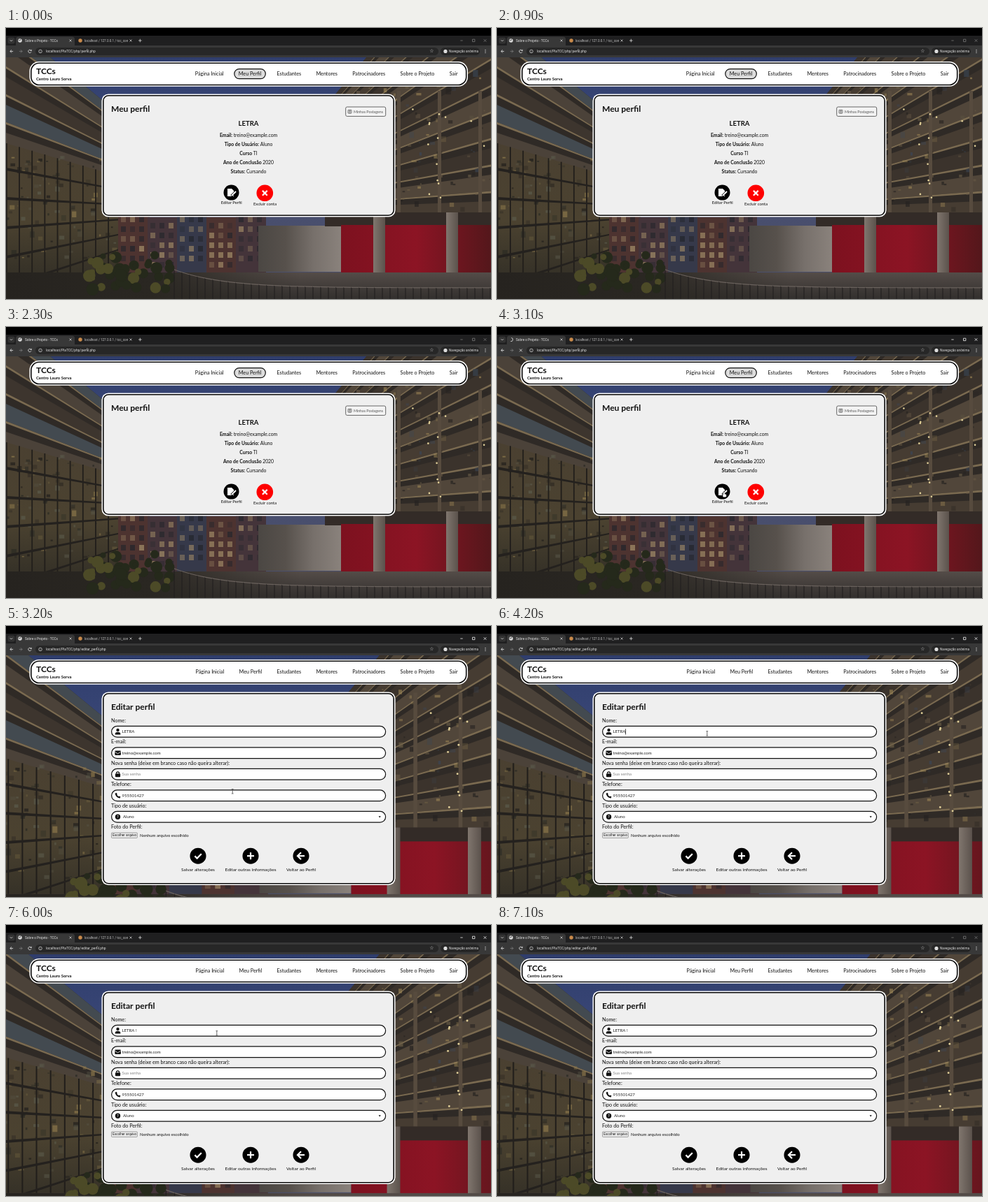
An HTML page with a canvas for the animation above (8 s loop, 692 by 388 pixels).

```html
<!DOCTYPE html>
<html lang="pt-BR">
<head>
<meta charset="utf-8">
<title>Perfil</title>
<style>
html, body { margin: 0; width: 100%; height: 100%; overflow: hidden; background: #000; }
canvas { display: block; width: 692px; height: 388px; }
</style>
</head>
<body>
<canvas id="stage" width="692" height="388"></canvas>
<script>
const W = 692, H = 388, TOP = 42, LOOP = 8000, STEP = 100;
const UI = 'Roboto, "Open Sans", sans-serif';
const PAGE = 'Lato, "Open Sans", sans-serif';
const SIGN = '"DejaVu Sans", sans-serif';
const USER = 'LETRA', MAIL = 'treino@example.com', PHONE = '955501427';
let c = document.getElementById('stage').getContext('2d');

// ---------- helpers ----------
const mix = (a, b, k) => a + (b - a) * k;
const clamp = k => Math.min(1, Math.max(0, k));

function rect(x, y, w, h, fill) { c.fillStyle = fill; c.fillRect(x, y, w, h); }

function round(x, y, w, h, r, fill, stroke, lw = 1) {
  c.beginPath();
  c.roundRect(x, y, w, h, r);
  if (fill) { c.fillStyle = fill; c.fill(); }
  if (stroke) { c.strokeStyle = stroke; c.lineWidth = lw; c.stroke(); }
}

function dot(x, y, r, fill) {
  c.beginPath();
  c.arc(x, y, r, 0, 7);
  c.fillStyle = fill;
  c.fill();
}

function ring(x, y, r, color, lw, from = 0, to = 7) {
  c.beginPath();
  c.arc(x, y, r, from, to);
  c.strokeStyle = color;
  c.lineWidth = lw;
  c.stroke();
}

// Points are offsets from (x, y).
function path(x, y, pts) {
  c.beginPath();
  for (const [dx, dy] of pts) c.lineTo(x + dx, y + dy);
}

function poly(x, y, fill, ...pts) { path(x, y, pts); c.fillStyle = fill; c.fill(); }

function line(x, y, color, lw, ...pts) {
  path(x, y, pts);
  c.strokeStyle = color;
  c.lineWidth = lw;
  c.stroke();
}

function cross(x, y, r, color, lw) {
  line(x, y, color, lw, [-r, -r], [r, r]);
  line(x, y, color, lw, [r, -r], [-r, r]);
}

function plus(x, y, r, color, lw) {
  line(x, y, color, lw, [-r, 0], [r, 0]);
  line(x, y, color, lw, [0, -r], [0, r]);
}

function arrow(x, y, r, color, lw, dir = -1) {
  line(x, y, color, lw, [0, -r], [dir * r, 0], [0, r]);
  line(x, y, color, lw, [dir * r, 0], [-dir * r, 0]);
}

function setFont(size, weight = 400, font = PAGE) { c.font = `${weight} ${size}px ${font}`; }

function text(s, x, y, size, { color = '#111', weight = 400, align = 'left', font = PAGE } = {}) {
  setFont(size, weight, font);
  c.fillStyle = color;
  c.textAlign = align;
  c.textBaseline = 'middle';
  c.fillText(s, x, y);
  return c.measureText(s).width;
}

function shade(x0, y0, x1, y1, ...stops) {
  const g = c.createLinearGradient(x0, y0, x1, y1);
  stops.forEach((s, i) => g.addColorStop(i / (stops.length - 1), s));
  return g;
}

function seeded(seed) {
  return () => (seed = (seed * 16807) % 2147483647) / 2147483647;
}

// ---------- backdrop ----------
const EYE = [330, 262];

// A strip running from the side edge towards the vanishing point.
function strip(edge, y0, y1, reach, fill) {
  const at = (y, k) => [mix(edge, EYE[0], k), mix(y, EYE[1], k)];
  poly(0, 0, fill, at(y0, 0), at(y0, reach), at(y1, reach), at(y1, 0));
}

function specks(n, rnd, x, y, w, h, colors) {
  for (let i = 0; i < n; i++) {
    c.globalAlpha = 0.2 + rnd() * 0.5;
    const size = 1.5 + rnd() * 6;
    rect(x + rnd() * w, y + rnd() * h, size, size * (0.4 + rnd()), colors[Math.floor(rnd() * colors.length)]);
  }
  c.globalAlpha = 1;
}

function wing(edge, top, reach, tones, pitch) {
  strip(edge, top, H, reach, '#2f2a26');
  for (let y = top, i = 0; y < EYE[1]; y += pitch, i++) {
    strip(edge, y, y + pitch * 0.62, reach, tones[i % tones.length]);
    strip(edge, y + pitch * 0.62, y + pitch * 0.7, reach, '#7a6a50');
  }
}

function leftWing(rnd) {
  wing(0, -10, 0.62, ['#434a50', '#4b4239', '#3d352e'], 40);
  strip(0, 165, 470, 0.62, shade(0, 165, 0, H, '#4a4031', '#4b4230', '#2b2923'));
  specks(120, rnd, 0, 180, 185, 150, ['#96804f', '#252722', '#5b5b4c', '#1f1d1b']);
  for (let k = 0; k < 0.62; k += 0.055) {
    const x = mix(0, EYE[0], k);
    rect(x, mix(165, EYE[1], k), 1.8, 200, '#211e1b');
  }
  for (let y = 200; y < H; y += 42) strip(0, y, y + 4, 0.62, '#24211e');
}

function rightWing(rnd) {
  wing(W, -170, 0.62, ['#3b332c', '#51463a', '#463c32'], 38);
  specks(90, rnd, 500, 60, 190, 200, ['#a48c58', '#252220', '#6d5f48', '#3c4655']);
  for (let x = 500; x < W; x += 58) rect(x, 90, 5, 180, '#574b3e');
  for (let i = 0; i < 14; i++) dot(560 + rnd() * 130, 90 + rnd() * 170, 1.3, '#e0cf98');
}

function street(rnd) {
  const tones = ['#4d3330', '#44343a', '#36394a'];
  for (let i = 0; i < 5; i++) {
    const x = 160 + i * 42, top = 262 + (i % 2) * 9;
    rect(x, top, 43, 90, tones[i % 3]);
    for (let n = 0; n < 15; n++) {
      c.globalAlpha = 0.25 + rnd() * 0.5;
      rect(x + 4 + (n % 3) * 13, top + 8 + Math.floor(n / 3) * 14, 7, 8, rnd() > 0.5 ? '#a08a66' : '#23252b');
    }
    c.globalAlpha = 1;
  }
  rect(360, 283, 118, 66, shade(360, 0, 478, 0, '#4b4743', '#57514c', '#77706b', '#8a827c'));
  rect(455, 264, 237, 20, '#332b27');
  rect(478, 282, 214, 72, shade(478, 0, W, 0, '#7d111f', '#8c1424', '#54171b'));
  for (let x = 524; x < W; x += 104) rect(x, 264, 17, 92, shade(x, 0, x + 17, 0, '#80766e', '#5b524c'));
}

function ground(rnd) {
  rect(0, 350, W, 80, shade(0, 350, 0, H, '#544c48', '#322f2d'));
  rect(0, 350, 420, 80, shade(0, 0, 420, 0, '#26231f', '#2a2722', '#2a272200'));
  for (let i = 0; i < 45; i++) dot(115 + rnd() * 120, 325 + rnd() * 50, 3 + rnd() * 6, rnd() > 0.6 ? '#4c4a27' : '#25291b');
  const rail = x => 346 + 26 * (1 - Math.exp((240 - x) / 70));
  for (let x = 240; x < W; x += 11) {
    line(x, rail(x), '#211f1f', 1.1, [0, 0], [0, 50]);
    line(x, rail(x), '#6a625d', 1.2, [0, 0], [11, rail(x + 11) - rail(x)]);
  }
}

function scene(zoom) {
  const layer = document.createElement('canvas');
  layer.width = W;
  layer.height = H;
  const main = c, rnd = seeded(41);
  c = layer.getContext('2d');
  c.translate(W / 2, TOP);
  c.scale(zoom, zoom);
  c.translate(-W / 2, -TOP);
  rect(0, TOP, W, H, shade(0, TOP, 0, 290, '#2f3d6c', '#3d4a7a', '#4a4f6c'));
  leftWing(rnd);
  rightWing(rnd);
  street(rnd);
  ground(rnd);
  c = main;
  return layer;
}

const backdrops = [scene(1), scene(1.11)];

// ---------- browser frame ----------
const INK = '#d8d8d8', DIM = '#777', BAR = '#383838';

function tab(x, title, size, color, end) {
  text(title, x + 13, 18.2, size, { color, font: UI });
  cross(end, 18, 1.5, INK, 0.7);
}

function browser(s) {
  const ctl = s.active ? '#f2f2f2' : DIM, y = 33.4;
  rect(0, 0, W, 11, '#000');
  rect(0, 11, W, 15, '#1f1f20');
  rect(0, 25, W, 17, BAR);
  round(14, 12.5, 84, 16, [4, 4, 0, 0], BAR);
  round(2.5, 13.5, 10, 9, 2.5, '#333');
  line(7.5, 18, INK, 0.8, [-1.7, -0.8], [0, 1], [1.7, -0.8]);

  if (s.loading) ring(20, 18, 2.6, INK, 0.9, -1.4, 1.8);
  else {
    dot(20, 18, 2.8, INK);
    line(20, 18, BAR, 0.7, [-2.4, -0.8], [0, 0], [1, -2.4]);
  }
  tab(14, 'Sobre o Projeto - TCCs', 4.7, '#e4e4e4', 92);
  dot(106, 18, 2.7, '#c98a4a');
  tab(99, 'localhost / 127.0.0.1 / tcc_con', 4.6, '#c4c4c4', 178);
  plus(191.3, 18, 2.3, INK, 0.8);

  line(650, 18, ctl, 0.8, [-1.7, 0], [1.7, 0]);
  round(665.5, 16.2, 3.4, 3.4, 0, null, ctl, 0.8);
  cross(683.5, 18, 1.8, ctl, 0.8);

  arrow(8, y, 2.1, INK, 0.9);
  arrow(21, y, 2.1, DIM, 0.9, 1);
  if (s.loading) cross(34, y, 1.9, INK, 0.9);
  else {
    ring(34, y, 2.2, INK, 0.9, 0.4, 5.4);
    poly(36.6, y, INK, [0, -2.8], [0, -0.4], [-2.4, -0.4]);
  }
  round(42, 28, 575, 11, 5.5, '#272727');
  ring(49, y, 2.3, INK, 0.7);
  text('i', 49, y + 0.2, 3.8, { color: INK, align: 'center', font: UI });
  const page = s.edit ? 'editar_perfil.php' : 'perfil.php';
  text('localhost/PlaTCC/php/' + page, 57, y + 0.3, 4.9, { color: '#e2e2e2', font: UI });
  text('☆', 607.5, y, 7, { color: INK, align: 'center', font: SIGN });
  round(620, 28, 56, 11, 5.5, '#262626');
  dot(627, y, 2.6, '#dedede');
  text('Navegação anônima', 632, y + 0.3, 4.6, { color: '#e2e2e2', font: UI });
  for (let i = -1; i < 2; i++) dot(684, y + i * 2, 0.6, INK);
}

// ---------- page ----------
const NAV = ['Página Inicial', 'Meu Perfil', 'Estudantes', 'Mentores', 'Patrocinadores', 'Sobre o Projeto', 'Sair'];
const BOLD = { weight: 700 }, MID = { align: 'center' };

function frame(x, y, w, h, r, fill) {
  round(x, y, w, h, r, '#fff');
  round(x + 2.3, y + 2.3, w - 4.6, h - 4.6, r - 2, fill, '#0a0a0a', 1.6);
}

function header(edit) {
  frame(33.5, 48, 625.5, 35.8, 13.5, '#fff');
  text('TCCs', 43, 62, 12, BOLD);
  text('Centro Lauro Sorva', 43, 73.2, 5.9, BOLD);
  let x = 644.5;
  for (const label of [...NAV].reverse()) {
    setFont(7.2);
    const w = c.measureText(label).width, pill = !edit && label === 'Meu Perfil';
    if (pill) {
      x -= 0.8;
      round(x - w - 6, 58.6, w + 12, 14, 7, '#dcdcdc', '#111', 1.2);
    }
    text(label, x - w, 65.9, 7.2);
    x -= w + 21.3;
  }
}

function card(title, h) {
  frame(136.5, 94.5, 419, h, 9.5, '#efefef');
  text(title, 150, 116.3, 12, BOLD);
}

function detail(label, value, y) {
  const size = 6.8;
  setFont(size);
  const b = c.measureText(value).width;
  setFont(size, 700);
  const a = c.measureText(label + ' ').width, x = 346 - (a + b) / 2;
  text(label, x, y, size, BOLD);
  text(value, x + a, y, size);
}

function profile() {
  card('Meu perfil', 176);
  round(484.7, 113, 57, 13.4, 2, '#f4f4f4', '#555', 0.9);
  round(488, 117.2, 5, 5, 0.8, null, '#444', 0.7);
  for (let y = 118.5; y < 122; y += 1.3) line(489, y, '#444', 0.6, [0, 0], [3, 0]);
  text('Minhas Postagens', 496, 120, 5.3, { color: '#555' });

  text(USER, 346, 137.3, 9.5, { ...BOLD, ...MID });
  const rows = { 'Email:': MAIL, 'Tipo de Usuário:': 'Aluno', Curso: 'TI', 'Ano de Conclusão': '2020', 'Status:': 'Cursando' };
  Object.entries(rows).forEach(([k, v], i) => detail(k, v, 153.8 + i * 13.1));

  dot(321.5, 235.6, 11, '#000');
  poly(316, 230, '#fff', [0, 0], [6, 0], [9, 3], [9, 11], [0, 11]);
  line(322, 240, '#000', 3.4, [-0.5, 0.5], [6, -6]);
  line(322, 240, '#fff', 2, [0, 0], [6, -6]);
  text('Editar Perfil', 321.7, 250.6, 5.9, MID);
  dot(369.3, 236.3, 11.8, '#fe0000');
  cross(369.3, 236.3, 3.4, '#fff', 2.2);
  text('Excluir conta', 369.5, 252, 5.9, MID);
}

const icons = {
  person(x, y) {
    dot(x, y - 2.2, 2.2, '#111');
    round(x - 3.9, y + 0.7, 7.8, 3.6, [3, 3, 0.6, 0.6], '#111');
  },
  mail(x, y) {
    round(x - 4.2, y - 3.2, 8.6, 6.6, 1, '#111');
    line(x, y, '#fff', 0.8, [-4.2, -1.6], [0, 1.2], [4.2, -1.6]);
  },
  lock(x, y) {
    ring(x, y - 1.3, 2.1, '#111', 1.2, Math.PI, 0);
    round(x - 3.6, y - 1, 7.2, 5, 1, '#111');
  },
  phone(x, y) {
    ring(x + 3.5, y - 3.4, 6.2, '#111', 1.8, 1.75, 2.95);
    line(x, y, '#111', 2.5, [-2.9, -3.4], [-1.8, -1]);
    line(x, y, '#111', 2.5, [1.2, 1.8], [3.4, 3]);
  },
  help(x, y) {
    dot(x, y, 3.7, '#111');
    text('?', x, y + 0.3, 5.4, { ...BOLD, ...MID, color: '#fff' });
  }
};

function editor(s) {
  card('Editar perfil', 276.5);
  const fields = [
    ['Nome:', 'person', s.name],
    ['E-mail:', 'mail', MAIL],
    ['Nova senha (deixe em branco caso não queira alterar):', 'lock', 'Sua senha'],
    ['Telefone:', 'phone', PHONE],
    ['Tipo de usuário:', 'help', 'Aluno']
  ];
  fields.forEach(([label, icon, value], i) => {
    const y = 151.2 + i * 30.5;
    text(label, 150, y - 15.6, 7.2);
    round(150.6, y - 7.8, 391, 15.8, 7.9, '#fff', '#111', 1.2);
    icons[icon](159.5, y);
    text(value, icon === 'help' ? 167 : 165.5, y + 0.4, 6, { color: icon === 'lock' ? '#858585' : '#222' });
  });
  if (s.caret) {
    setFont(6);
    rect(Math.round(165.5 + c.measureText(s.name).width), 147.4, 0.8, 8, '#111');
  }
  poly(533.2, 273, '#111', [-1.6, -0.7], [1.6, -0.7], [0, 1.4]);

  text('Foto do Perfil:', 150, 288.2, 7.2);
  round(150.5, 296, 36.8, 7.4, 0.8, '#efefef', '#777', 0.7);
  text('Escolher arquivo', 169, 299.9, 4.6, { ...MID, font: '"Liberation Sans", sans-serif' });
  text('Nenhum arquivo escolhido', 191, 299.8, 5.95);

  const actions = { 'Salvar alterações': 274, 'Editar outras informações': 349, 'Voltar ao Perfil': 421 }, y = 329.2;
  for (const [label, x] of Object.entries(actions)) {
    dot(x, y, 11.5, '#000');
    text(label, x, y + 20.2, 6.5, MID);
  }
  line(274, y, '#fff', 2.2, [-4.6, 0.2], [-1.4, 3.4], [4.8, -3]);
  plus(349, y, 5, '#fff', 2.2);
  arrow(421, y, 5, '#fff', 2.2);
}

// ---------- pointer ----------
function beam(x, y) {
  line(x, y, '#444', 0.8, [0, -3.2], [0, 3.2]);
  for (const dy of [-3.2, 3.2]) line(x, y + dy, '#444', 0.7, [-1.4, 0], [1.4, 0]);
}

function hand(x, y) {
  round(x - 1, y - 3.5, 1.9, 6, 0.9, '#fff', '#000', 0.6);
  round(x - 2, y, 5.4, 4.8, 1.5, '#fff', '#000', 0.6);
  rect(x - 0.7, y - 2, 1.3, 4, '#fff');
}

function pointer(t) {
  if (t >= 2900 && t < 3200) hand(324, 239);
  if (t < 3200 || t >= 6900) return;
  const p = clamp((t - 3500) / 700), e = p * p * (3 - 2 * p);
  const nudge = t >= 4500 ? 1 : 0;
  beam(mix(323.2, 299.8, e) + nudge, mix(236.8, 153.8, e) + nudge);
}

// ---------- timeline ----------
function draw(now) {
  const t = Math.floor((now % LOOP) / STEP) * STEP;
  const s = {
    edit: t >= 3200,
    active: t >= 3000 && t < 6900,
    loading: t >= 3000 && t < 3200,
    name: USER + (t >= 5500 ? ' !' : t >= 5000 ? ' ' : ''),
    caret: (t >= 4200 && t < 4800) || (t >= 5000 && t < 5500)
  };
  c.drawImage(backdrops[s.edit ? 1 : 0], 0, 0);
  browser(s);
  header(s.edit);
  if (s.edit) editor(s);
  else profile();
  pointer(t);
}

let start;
function tick(now) {
  start ??= now;
  draw(now - start);
  requestAnimationFrame(tick);
}
draw(0);
requestAnimationFrame(tick);
</script>
</body>
</html>
```
